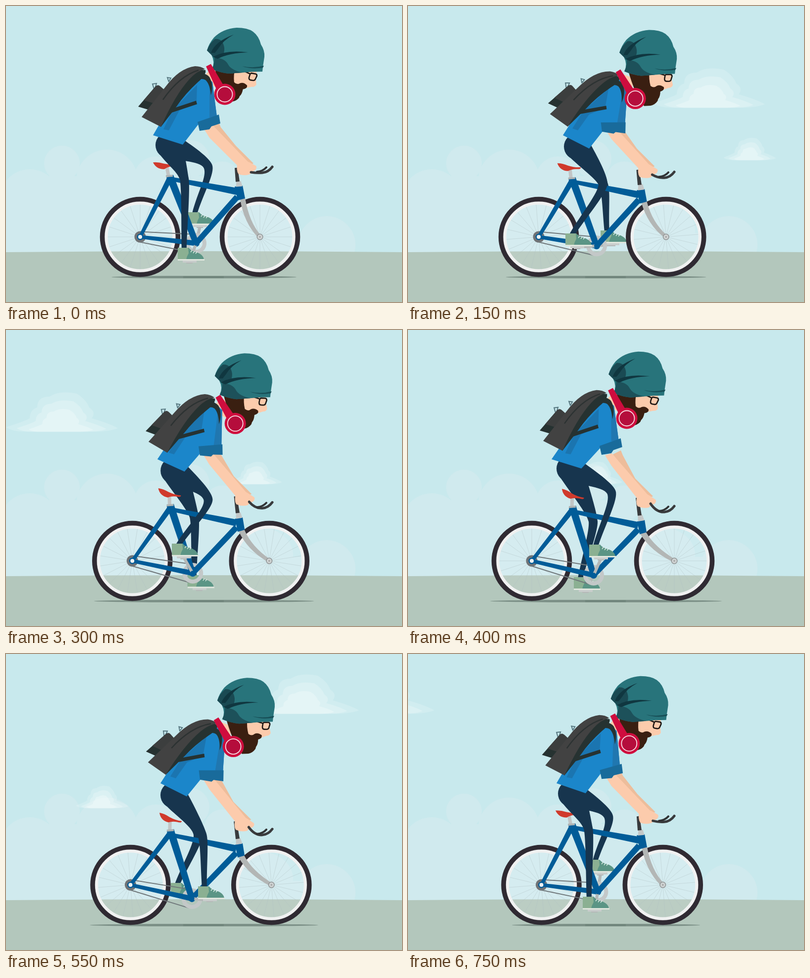
Animation of 800 by 600 pixels, one loop 800 ms. Source, as an HTML page with a canvas:

```html
<!DOCTYPE html>
<html lang="en">
<head>
<meta charset="utf-8">
<title>Cyclist</title>
<style>
html, body { margin: 0; width: 100%; height: 100%; overflow: hidden; }
canvas { display: block; width: 800px; height: 600px; }
</style>
</head>
<body>
<canvas id="stage" width="800" height="600"></canvas>
<script>
const c = document.getElementById('stage').getContext('2d');
const LOOP = 800, STEP = 50, DEG = Math.PI / 180;
const KEYS = [0, 150, 250, 400, 550, 650, 750], PERIOD = 765;
const BLUE = '#015c98', DARK = '#263231', SKIN = '#fccbac', GREY = '#b4b8b7', PANTS = '#17354e';
let time = 0;

// Smooth periodic curve through one value per key time.
function track(...v) {
  const n = KEYS.length, i = KEYS.findLastIndex(k => k <= time);
  const [[t0, a], [t1, b], [t2, d], [t3, e]] = [-1, 0, 1, 2].map(o => {
    const turn = Math.floor((i + o) / n), m = i + o - turn * n;
    return [KEYS[m] + turn * PERIOD, v[m]];
  });
  const h = t2 - t1, u = (time - t1) / h;
  const m1 = (d - a) / (t2 - t0) * h, m2 = (e - b) / (t3 - t1) * h;
  return b + u * (m1 + u * (3 * (d - b) - 2 * m1 - m2 + u * (2 * (b - d) + m1 + m2)));
}

const mix = (a, b, k) => a.map((v, i) => v + (b[i] - v) * k);

function poly(color, p) {
  c.beginPath();
  for (let i = 0; i < p.length; i += 2) c.lineTo(p[i], p[i + 1]);
  c.closePath();
  c.fillStyle = color;
  c.fill();
}

function shape(color, d) {
  c.fillStyle = color;
  c.fill(new Path2D(d));
}

function stroke(color, width, d) {
  c.strokeStyle = color;
  c.lineWidth = width;
  c.stroke(new Path2D(d));
}

function oval(color, x, y, rx, ry = rx) {
  c.beginPath();
  c.ellipse(x, y, rx, ry, 0, 0, 7);
  c.fillStyle = color;
  c.fill();
}

function ring(color, x, y, r, width) {
  c.beginPath();
  c.arc(x, y, r, 0, 7);
  c.strokeStyle = color;
  c.lineWidth = width;
  c.stroke();
}

function place(dx, dy, turn, px, py, draw) {
  c.save();
  c.translate(px + dx, py + dy);
  c.rotate(turn * DEG);
  c.translate(-px, -py);
  draw();
  c.restore();
}

function tube(color, [x1, y1], w1, [x2, y2], w2 = w1) {
  const l = Math.hypot(x2 - x1, y2 - y1) * 2, nx = (y1 - y2) / l, ny = (x2 - x1) / l;
  poly(color, [x1 + nx * w1, y1 + ny * w1, x2 + nx * w2, y2 + ny * w2,
    x2 - nx * w2, y2 - ny * w2, x1 - nx * w1, y1 - ny * w1]);
}

function cloud(x, y, sx, sy) {
  const d = 'M-108-10Q-70-22-60-28Q-60-45-45-50Q-45-72-20-72Q0-85 35-78Q55-65 60-50' +
    'Q75-40 65-28Q100-18 118-8Q100 0 60-1H-70Q-95-1-108-10Z';
  [1, .8, .58].forEach((k, i) => {
    c.save();
    c.translate(x, y);
    c.scale(sx * k, sy * k);
    shape(`rgba(255,255,255,${.17 + .04 * i})`, d);
    c.restore();
  });
}

function backdrop() {
  c.fillStyle = '#c8e9ed';
  c.fillRect(0, 0, 800, 600);
  const pale = '#d0eaee';
  oval(pale, 48, 391, 60);
  oval(pale, 113, 319, 36);
  oval(pale, 204, 353, 62);
  oval(pale, 303, 350, 45);
  oval(pale, 373, 310, 38);
  oval(pale, 437, 351, 36);
  oval(pale, 510, 455, 70, 55);
  oval(pale, 648, 484, 58);
  c.fillRect(0, 385, 465, 115);
  c.fillRect(60, 345, 385, 60);
  c.fillRect(460, 460, 180, 40);
  shape('#b3c7bc', 'M0 499Q400 495 800 499V600H0Z');
  cloud(1098 - 3.3 * time, 207, 1, 1);
  cloud(2410 - 3.3 * time, 122, 1, 1);
  cloud(874 - 1.24 * time, 313, .47, .57);
}

function wheel(x) {
  oval('rgba(255,255,255,.1)', x, 468, 68);
  c.beginPath();
  for (let i = 0; i < 20; i++) {
    const a = (i * 18 + time * .45) * DEG;
    c.moveTo(x, 468);
    c.lineTo(x + 66 * Math.cos(a), 468 + 66 * Math.sin(a));
  }
  c.strokeStyle = 'rgba(175,190,192,.55)';
  c.lineWidth = .8;
  c.stroke();
  ring('#b9b4b5', x, 468, 72, 3);
  ring('#f0f1f1', x, 468, 68.5, 6);
  ring('#2f2a32', x, 468, 76.5, 9.5);
}

function leg(hip, knee, ankle) {
  const unit = (x, y) => [x / Math.hypot(x, y), y / Math.hypot(x, y)];
  const u = unit(knee[0] - hip[0], knee[1] - hip[1]);
  const v = unit(ankle[0] - knee[0], ankle[1] - knee[1]);
  const w = unit(u[0] + v[0], u[1] + v[1]);
  const off = (p, d, along, side) => [p[0] + d[0] * along - d[1] * side, p[1] + d[1] * along + d[0] * side];
  const curve = (...p) => c.bezierCurveTo(...p.flat());
  c.beginPath();
  c.moveTo(...off(hip, u, 0, 26));
  curve(off(hip, u, 28, 23), off(knee, w, -18, 10), off(knee, w, 0, 9));
  curve(off(knee, w, 18, 9), off(ankle, v, -45, 6), off(ankle, v, 0, 5));
  c.lineTo(...off(ankle, v, 0, -5));
  curve(off(ankle, v, -45, -6), off(knee, w, 18, -9), off(knee, w, 0, -9));
  curve(off(knee, w, -18, -10), off(hip, u, 28, -23), off(hip, u, 0, -26));
  c.fillStyle = PANTS;
  c.fill();
}

function shoe([x, y]) {
  place(x, y, 0, 0, 0, () => {
    shape('#c9cdcc', 'M10 26H38V31H10Z');
    shape(GREY, 'M17 31H30V33H17Z');
    shape('#5b9585', 'M0 1H22Q27 7 34 9Q51 13 53 25H0Z');
    shape('#8bb092', 'M0 1H21L22 12Q18 19 17 25H0Z');
    shape('#dfe6dd', 'M0 24H54V27H0Z');
    stroke('#e6f0ea', 1.3, 'M26 10l3-4M31 12l3-4M36 13l3-4');
  });
}

const pedal = ([x, y]) => [x + 24, y + 29];
const ankleOf = ([x, y]) => [x + 13, y + 4];

function bike(s, far, near, hip, kneeFar, kneeNear) {
  const p = (x, y, dx, dy) => [x + dx * s, y + dy * s];
  const rear = p(271, 468, -21, 0), front = p(513, 468, 25, 0);
  const hub = p(384, 481, -9, 16), seat = p(330, 351, 2, 13), head = p(467, 376, -2, 20);

  oval('#7c9087', 400, 549.5, 187 + 47 * s, 2.6);
  c.fillStyle = '#72877d';
  c.fillRect(358, 547.5, 82, 4.5);

  tube(GREY, hub, 6, pedal(far));
  leg(hip, kneeFar, ankleOf(far));
  shoe(far);
  wheel(rear[0]);
  wheel(front[0]);

  // Transmission
  oval('#707376', ...rear, 11.5);
  tube('#70787b', [rear[0], 457.5], 2, [hub[0], hub[1] - 18]);
  tube('#70787b', [rear[0], 478.5], 2, [hub[0] - 6, hub[1] + 19]);
  ring('#c3c8c8', ...hub, 17, 8);

  // Saddle and frame
  tube('#c2c5c5', p(324, 322, 8, 12), 7, p(329, 348, 2, 13));
  place(297 + 14 * s, 317 + 5 * s, 4 + 18 * s, 0, 0, () =>
    shape('#d03a2c', 'M0 0Q10-2 22 1Q36 3 48 0Q50 4 40 5Q30 7 24 12Q8 14 0 0Z'));
  tube(BLUE, seat, 11, rear, 7);
  tube(BLUE, p(331, 345, 1, 13), 15, hub, 12);
  tube(BLUE, p(336, 351, 3, 18), 8, head, 14);
  tube(BLUE, p(467, 387, -2, 17), 12, hub, 11);
  tube(BLUE, rear, 7, hub, 11);
  oval(BLUE, ...hub, 7);
  oval(BLUE, ...rear, 6.5);
  oval('#eef2f3', ...rear, 4);
  tube('#aeb3b3', p(323, 345, 2, 14), 4, p(337, 344, 2, 14));

  // Fork and steering
  const f = mix([473, 392, 481, 440, 509, 469, 515, 465, 491, 438, 483, 389],
    [469, 413, 490, 448, 535, 470, 540, 465, 498, 440, 481, 410], s);
  shape('#b3b6b5', `M${f[0]} ${f[1]}Q${f.slice(2, 6)} L${f[6]} ${f[7]}Q${f.slice(8)}Z`);
  oval('#8e9293', ...front, 6.5);
  oval('#d0d4d4', ...front, 5);
  oval('#aaa', ...front, 2);
  poly(BLUE, mix([462, 366, 478, 364, 483, 390, 468, 394], [463, 388, 478, 385, 482, 410, 468, 414], s));
  tube('#c3c7c7', p(470, 355, -1, 20), 9, p(471, 366, 0, 21), 13);
  tube('#393b3d', p(465, 328, -2, 12), 6, p(468, 356, 0, 20), 8);

  tube(GREY, hub, 6, pedal(near));
  oval(BLUE, ...hub, 5);
  oval(PANTS, ...hip, 27);
  leg(hip, kneeNear, ankleOf(near));
  shoe(near);
}

function arms(s, b) {
  const hx = -5 * s, hy = 18 * s, ty = 8 * s;
  poly('#edbd9b', [414, 244 + ty, 430, 236 + ty, 434, 246 + ty, 464 + hx, 283 + hy,
    500 + hx, 319 + hy, 482 + hx, 326 + hy]);
  poly(SKIN, [398, 246 + ty, 418 - 6 * s * (1 - b), 242 + ty, 492 + hx, 319 + hy,
    470 + hx, 326 + hy, 411, 267 + ty]);
  place(hx, hy, 6 * s, 485, 328, () => {
    shape(SKIN, 'M468 317Q480 310 492 317L505 324Q508 328 503 333Q497 335 493 341Q482 345 470 341Q464 333 468 317Z');
  });
  const [x, y] = [495 - 5 * s, 337 + 15 * s], tip = 326 + 31 * s;
  c.lineCap = 'round';
  stroke('#393b3d', 5, `M${x} ${y}Q${x + 12} ${tip + 13} 518 ${tip + 12}Q530 ${tip + 11} 538 ${tip}`);
  stroke('#303234', 4, `M507 ${tip + 10}Q519 ${tip + 9} 526 ${tip + 1}`);
  c.lineCap = 'butt';
}

function torso(b, phones) {
  const tail = track(297, 313, 314, 290, 312, 314, 300), hem = tail + 60 - 8 * b;
  // Neck
  place(27 * phones, 18 * phones, 0, 0, 0, () => poly(SKIN, [404, 138, 415, 126, 440, 136, 436, 172, 416, 160]));
  poly('#1b86ca', [tail, 262, ...mix([330, 205, 380, 152, 404, 141, 417, 154, 426, 224, 390, 238],
    [345, 215, 405, 165, 430, 150, 447, 166, 440, 242, 394, 256], b), hem, 281 + 9 * b]);
  poly('#2077b0', mix([411, 152, 417, 154, 426, 224, 411, 226], [438, 165, 447, 166, 440, 242, 424, 240], b));
  poly('#1b75b0', mix([318, 250, 336, 212, 386, 160, 385, 195, 350, 212, 329, 252],
    [334, 248, 356, 214, 408, 168, 400, 208, 368, 221, 345, 252], b));
  poly('#196b9b', mix([387, 235, 430, 220, 433, 238, 415, 244, 411, 250, 391, 253],
    [390, 236, 441, 238, 440, 261, 420, 257, 416, 260, 392, 255], b));
}

function bag(b) {
  place(30 * b, 12 * b, track(0, 8.2, 5.6, 0, 8, 5.6, .6), 382, 122, () => {
    stroke('#587982', 2, 'M299 168L296 158L304 157L301 167M329 154L326 145L333 146L329 153');
    shape(DARK, 'M267 204L303 162L320 170L287 210Z');
    shape('#3c3e3e', 'M278 191L302 163Q307 158 312 163L320 170L301 198Z');
    shape(DARK, 'M313 245L292 225L330 165Q355 135 382 128L403 130Q405 140 388 154Q362 178 345 203Z');
    shape('#424242', 'M274 225L322 164Q350 126 382 122Q394 122 402 128Q386 131 370 149Q342 180 313 245Z');
    stroke('#2c3232', 2.5, 'M317 190Q350 142 389 130');
    shape(DARK, 'M326 219L336 208L384 192L386 199Z');
    shape(DARK, 'M386 138Q402 134 411 144Q420 160 414 181Q412 158 403 150Q396 146 386 150Z');
  });
}

function head(b, phones) {
  const r = 1 - b;
  place(-31 * r, -3 * r, 10 * r, 525, 148, () => {
    shape(SKIN, 'M480 130L535 130L536 148L539 160Q537 166 531 166L518 171L490 168Z');
    shape('#3a1f11', 'M448 132H491Q490 150 494 163Q501 168 506 163Q513 159 521 165Q523 171 514 174' +
      'Q514 184 510 189L509 193Q504 201 495 203L482 204Q462 180 448 132Z');
    stroke('#1d1714', 2.6, 'M525 139H534Q537 139 537 143L535 150Q534 153 530 153H526Q522 153 522 148L523 141ZM523 141L512 138');
  });
  place(24 * b, 5 * b, 0, 0, 0, () => {
    shape('#28747b', 'M406 90Q410 76 420 64Q438 46 466 44Q488 44 499 52Q511 61 515 78Q523 90 522 103' +
      'L519 123L518 133Q495 133 478 135L450 137Q432 135 416 128Q423 114 415 99Z');
    shape('#1a4a53', 'M406 90Q411 76 422 67Q438 65 441 85Q442 102 428 107Q421 106 415 99Z');
    shape('#1d515a', 'M421 105Q442 105 449 119Q455 130 478 135L450 137Q432 135 416 128Q422 116 421 105Z');
    shape('#103740', 'M414 95Q422 72 460 58Q438 70 429 86L422 95Z');
    shape('#103740', 'M418 103Q446 88 489 94Q452 95 427 107Z');
    shape('#174e56', 'M477 122Q500 127 521 121L519 125Q496 129 477 122Z');
  });
  const top = [409 + 27 * phones, 120 + 20 * phones], cup = [442 + 30 * phones, 179 + 15 * phones];
  tube('#cf0d3e', top, 11, [cup[0] - 7, cup[1] - 9], 17);
  oval('#cf0d3e', ...cup, 21.5);
  oval('#b50d3c', ...cup, 15);
  ring('#f6dce2', ...cup, 15.5, 1.8);
}

function draw() {
  const squash = track(0, .33, .6, 1, .93, .52, .07);
  const bend = track(0, .88, 1, -.03, .87, .95, .15);
  const phones = track(0, .57, 1, 0, .57, 1, .16);
  const near = [track(347, 318, 322, 366, 388, 377, 353), track(489, 460, 436, 434, 470, 490, 491)];
  const far = [track(368, 389, 382, 335, 333, 334, 365), track(417, 454, 488, 500, 463, 432, 416)];
  const hip = [track(329, 342, 345, 327, 339, 336, 330), track(282, 285, 287, 281, 286, 284, 283)];
  const kneeNear = [track(360, 394, 405, 411, 396, 384, 364), track(350, 360, 353, 329, 366, 370, 353)];
  const kneeFar = [track(408, 395, 385, 374, 388, 395, 405), track(325, 362, 372, 388, 366, 353, 329)];

  backdrop();
  bike(squash, far, near, hip, kneeFar, kneeNear);
  arms(squash, bend);
  torso(bend, phones);
  bag(bend);
  head(bend, phones);
}

function frame() {
  time = Math.floor(performance.now() % LOOP / STEP) * STEP;
  draw();
  requestAnimationFrame(frame);
}
frame();
</script>
</body>
</html>
```
